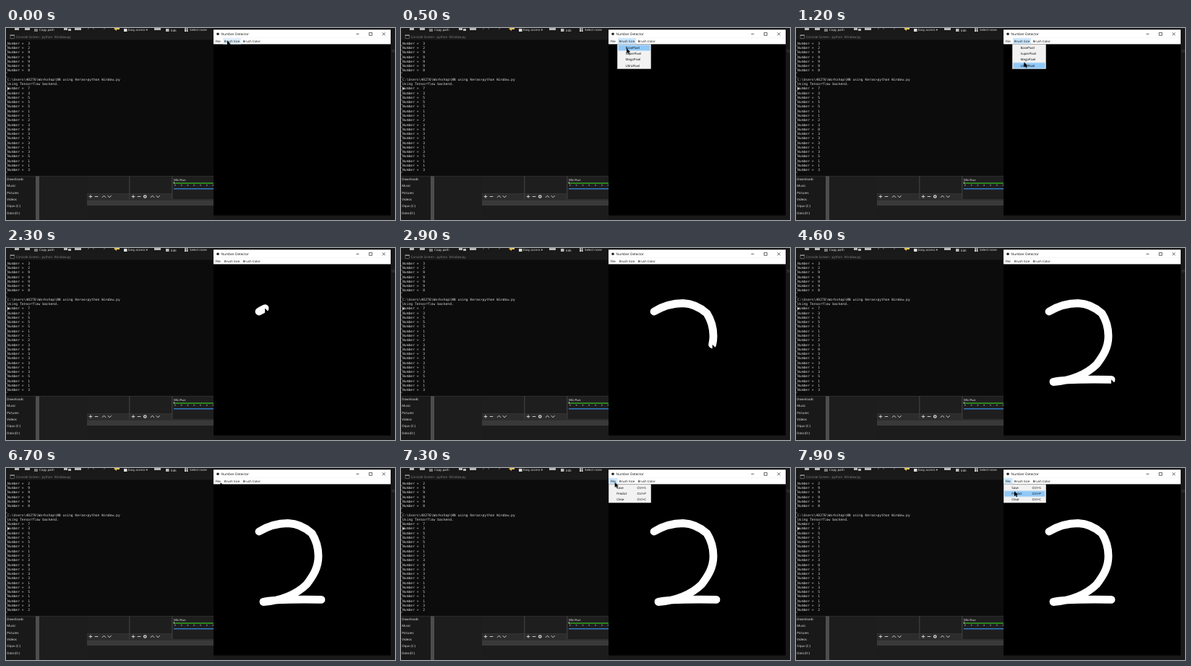
An HTML page for the animation above (8 s loop, 538 by 266 pixels).

```html
<!DOCTYPE html>
<html lang="en">
<head>
<meta charset="utf-8">
<title>Number Detector</title>
<style>
html, body { margin: 0; width: 100%; height: 100%; overflow: hidden; background: #191919; }
svg {
  display: block; width: 100vw; height: 100vh;
  --trail: path("M350 88C363 80 377 76.5 390 76.5C403 77 414 82.5 423 90.5C429 100 432 110 432 122C432 138 425 149 416 161C402 175 380 184 356 185.5C364 183 380 181.5 436 182.3");
}
text { font: 4.4px "Open Sans", "Noto Sans", sans-serif; text-rendering: geometricPrecision; white-space: pre; }
.console text { font: 4.72px "DejaVu Sans Mono", monospace; fill: #d6d6d6; }
.light text { fill: #f0f0f0; }
.icons { fill: none; stroke: #ddd; stroke-width: .9; }

/* One loop is 8 s, so 1.25% is 100 ms. */
.before, .after, .brush-menu, .brush-hot, .brush-pick, .file-menu, .file-hot, .file-pick {
  animation: 8s step-end infinite;
}
.before { animation-name: before; }
.after { animation-name: after; }
.brush-hot { animation-name: brush-hot; }
.brush-menu { animation-name: brush-menu; }
.brush-pick { animation-name: brush-pick; }
.file-hot { animation-name: file-hot; }
.file-menu { animation-name: file-menu; }
.file-pick { animation-name: file-pick; }
.pointer { animation: point 8s linear infinite; }
.pen {
  offset-path: var(--trail);
  offset-rotate: 0deg;
  animation: follow 8s linear infinite, pen-shown 8s step-end infinite;
}
.stroke {
  d: var(--trail);
  fill: none; stroke: #fff; stroke-width: 10.8; stroke-linecap: round; stroke-linejoin: round;
  stroke-dasharray: 100 200;
  animation: draw 8s linear infinite;
}
@keyframes before { 0% { visibility: visible } 62.5%, 100% { visibility: hidden } }
@keyframes after { 0% { visibility: hidden } 62.5%, 100% { visibility: visible } }
@keyframes brush-hot {
  0% { visibility: visible; fill: #e0f0fd }
  2.5% { visibility: visible; fill: #cce8ff }
  17.5%, 100% { visibility: hidden }
}
@keyframes brush-menu { 0% { visibility: hidden } 2.5% { visibility: visible } 17.5%, 100% { visibility: hidden } }
@keyframes brush-pick {
  0% { visibility: hidden; transform: none }
  5% { visibility: visible; transform: none }
  10% { visibility: visible; transform: translateY(8.2px) }
  12.5% { visibility: visible; transform: translateY(16.4px) }
  15% { visibility: visible; transform: translateY(24.6px) }
  17.5%, 100% { visibility: hidden; transform: none }
}
@keyframes file-hot {
  0% { visibility: hidden }
  85% { visibility: visible; fill: #e0f0fd }
  87.5%, 100% { visibility: visible; fill: #cce8ff }
}
@keyframes file-menu { 0% { visibility: hidden } 87.5%, 100% { visibility: visible } }
@keyframes file-pick {
  0% { visibility: hidden; transform: none }
  92.5% { visibility: visible; transform: none }
  97.5%, 100% { visibility: visible; transform: translateY(8.2px) }
}
@keyframes point {
  0%, 2.5% { transform: translate(306px, 17.6px) }
  6.25%, 8.75% { transform: translate(312px, 28px) }
  16.25%, 27.4% { transform: translate(316px, 51px) }
  27.5%, 82.5% { transform: translate(340px, 80px) }
  83.75% { transform: translate(296.5px, 20px) }
  86.25%, 90% { transform: translate(294px, 17px) }
  93.75% { transform: translate(299px, 25px) }
  98.75%, 100% { transform: translate(302px, 32px) }
}
@keyframes draw {
  0%, 27.45% { stroke-dashoffset: 110 }
  27.5% { stroke-dashoffset: 100 }
  28.75% { stroke-dashoffset: 97 }
  36.25% { stroke-dashoffset: 59 }
  38.75% { stroke-dashoffset: 47 }
  50% { stroke-dashoffset: 1 }
  51.25%, 100% { stroke-dashoffset: 0 }
}
@keyframes follow {
  0%, 27.5% { offset-distance: 0% }
  28.75% { offset-distance: 3% }
  36.25% { offset-distance: 41% }
  38.75% { offset-distance: 53% }
  50% { offset-distance: 99% }
  51.25%, 100% { offset-distance: 100% }
}
@keyframes pen-shown { 0% { visibility: hidden } 27.5% { visibility: visible } 76.25%, 100% { visibility: hidden } }
</style>
</head>
<body>
<svg viewBox="0 0 538 266">
  <defs>
    <path id="arrow" d="M0 0V7.2L1.7 5.6L2.9 8.2L4.1 7.6L3 5.2H5.2Z"/>
    <path id="tools" d="M-2.3 0H2.3M0-2.3V2.3M5.7 0H10.3"/>
    <path id="chevrons" d="M-2.5 1.3L0-1.3L2.5 1.3M5.2-1.3L7.7 1.3L10.2-1.3"/>
  </defs>
  <rect width="538" height="266" fill="#191919"/>
  <path d="M533 31h5M534 33h4" stroke="#444" stroke-width=".8"/>

  <!-- file manager ribbon -->
  <g class="light">
    <path d="M12 0h6v3h-6zM26 0h7v3h-7zM80 0h5v3h-5zM86 1h4v3h-4zM95 0h9v3h-9zM205 0h9v3h-9zM221 1h4.500v4h-4.500z" fill="#b9b9b9"/>
    <path d="M247 .5h2v2h-2zM249.600 .5h2v2h-2zM247 3.100h2v2h-2zM249.600 3.100h2v2h-2z" fill="#ddd"/>
    <path d="M39 1h5v4h-5z" fill="#777"/>
    <path d="M163 1h4.500v4h-4.500z" fill="#ddd"/>
    <path d="M149 1l4-2v1h4v2h-4v2z" fill="#e8c55a"/>
    <path d="M113 2l2-2M122 2l-2-2M135 2l2-2" stroke="#666" fill="none"/>
    <text x="46" y="4.300">Copy path</text>
    <text x="169" y="4.300">Easy access ▾</text>
    <text x="228" y="4.600">Edit</text>
    <text x="254" y="4.300">Select none</text>
  </g>

  <!-- side list and recorder panels -->
  <g class="light" id="places">
    <rect x="41" y="205" width="5" height="61" fill="#4d4d4d"/>
    <rect x="46" y="205" width="66" height="61" fill="#1d1d1d"/>
  </g>
  <rect x="112" y="205" width="175" height="41" fill="#3a393a"/>
  <rect x="112" y="246" width="175" height="20" fill="#1c1c1c"/>
  <path d="M112 205h58v24h-58zM171.500 205h57.500v24h-57.500zM230.500 205h56.500v32h-56.500z" fill="#1f1e1f"/>
  <path d="M112 229.500h58v8h-58zM171.500 229.500h57.500v8h-57.500z" fill="#2d2c2d"/>
  <path d="M112 238h175" stroke="#222" stroke-width=".8"/>
  <g class="icons">
    <use href="#tools" x="117" y="233.500"/>
    <use href="#chevrons" x="135.500" y="233.500"/>
    <use href="#tools" x="176" y="233.500"/>
    <circle cx="192.300" cy="233.500" r="1.700" stroke-width="1.300"/>
    <use href="#chevrons" x="202.500" y="233.500"/>
  </g>
  <g class="light"><text x="232" y="212.300">Mic/Aux</text></g>
  <path d="M232 215h55" stroke="#2b8420" stroke-width="2.200"/>
  <path d="M232.300 213v3" stroke="#ddd" stroke-width=".8"/>
  <path d="M233 217.800h54" stroke="#888" stroke-width="1.600" stroke-dasharray="1.600 7.200"/>
  <path d="M232 222.700h55" stroke="#2f7fc2" stroke-width="1.600"/>

  <!-- console -->
  <rect y="6.500" width="287" height="10" fill="#1a1a1a"/>
  <rect y="16.500" width="287" height="188.500" fill="#0c0c0c"/>
  <path d="M0 205.300h287" stroke="#3a3a3a" stroke-width=".6"/>
  <rect x="6" y="9.600" width="5.500" height="4.800" fill="#111" stroke="#888" stroke-width=".6"/>
  <path d="M6 10.300h5.500" stroke="#aaa"/>
  <text x="13.500" y="13.900" fill="#858585" style="font-size:4.5px">Console Screen - python  Window.py</text>
  <path d="M1 23.500V203" stroke="#777" stroke-width=".9" stroke-dasharray="1.800 4.470"/>
  <path d="M2 82l3.500 2.800h-2.200l-1.300 1.600z" fill="#ddd"/>
  <g class="console before"></g>
  <g class="console after"></g>

  <!-- detector window -->
  <rect x="287" y="2.300" width="245" height="257.300" fill="#000"/>
  <rect x="287" y="2.300" width="245" height="20.100" fill="#fff"/>
  <path d="M287 13.500h245" stroke="#fbf6fa"/>
  <circle cx="293" cy="8.200" r="1.800" fill="#222"/>
  <path d="M484.300 8.300h4M502.200 6.300h4v4h-4zM520.500 6.300l4 4m0-4l-4 4" fill="none" stroke="#222" stroke-width=".7"/>
  <text x="297.600" y="10.100" fill="#111" style="font-size:4.7px">Number Detector</text>
  <rect class="brush-hot" x="300" y="14" width="25" height="8.400"/>
  <rect class="file-hot" x="287" y="14" width="12.500" height="8.400"/>
  <text x="289.700" y="20.200">File</text>
  <text x="301.800" y="20.200">Brush Size</text>
  <text x="327.500" y="20.200">Brush Color</text>
  <path class="stroke" pathLength="100"/>

  <g class="brush-menu">
    <rect x="299.300" y="22.800" width="46.200" height="33.600" fill="#f2f2f2" stroke="#ccc" stroke-width=".6"/>
    <rect class="brush-pick" x="300.500" y="23.500" width="44" height="7.900" fill="#91c9f7"/>
    <g id="brushes"></g>
  </g>
  <g class="file-menu">
    <rect x="287.300" y="22.800" width="58.400" height="25.200" fill="#f2f2f2" stroke="#ccc" stroke-width=".6"/>
    <rect class="file-pick" x="288.300" y="23.500" width="56" height="7.900" fill="#91c9f7"/>
    <g id="commands"></g>
  </g>
  <use class="pointer" href="#arrow"/>
  <use class="pen" href="#arrow"/>
</svg>
<script>
function addText(parent, x, y, content) {
  const node = document.createElementNS("http://www.w3.org/2000/svg", "text");
  node.setAttribute("x", x);
  node.setAttribute("y", y);
  node.textContent = content;
  parent.append(node);
}
const find = selector => document.querySelector(selector);
const results = digits => [...digits].map(digit => `Number =  ${digit}`);

const log = [
  ...results("3299998"), "",
  "C:\\Users\\40276\\Workshop\\NN using Keras>python Window.py",
  "Using Tensorflow backend.",
  ...results("73555112383331351132")
];
const visibleRows = 29;
const showLog = (selector, first) =>
  log.slice(first, first + visibleRows).forEach((line, row) =>
    addText(find(selector), 2, 22.7 + row * 6.27, line));
showLog(".before", 0);
showLog(".after", 1);

["Downloads", "Music", "Pictures", "Videos", "Oquv (C:)", "Data (D:)"].forEach((name, i) =>
  addText(find("#places"), 1.3, 210.8 + i * 9.35, name));

["Base", "Super", "Mega", "Ultra"].forEach((size, i) =>
  addText(find("#brushes"), 310.5, 29 + i * 8.2, size + "Pixel"));

["Save", "Predict", "Clear"].forEach((name, i) => {
  addText(find("#commands"), 298.3, 29 + i * 8.2, name);
  addText(find("#commands"), 326.5, 29 + i * 8.2, "Ctrl+" + name[0]);
});
</script>
</body>
</html>
```
